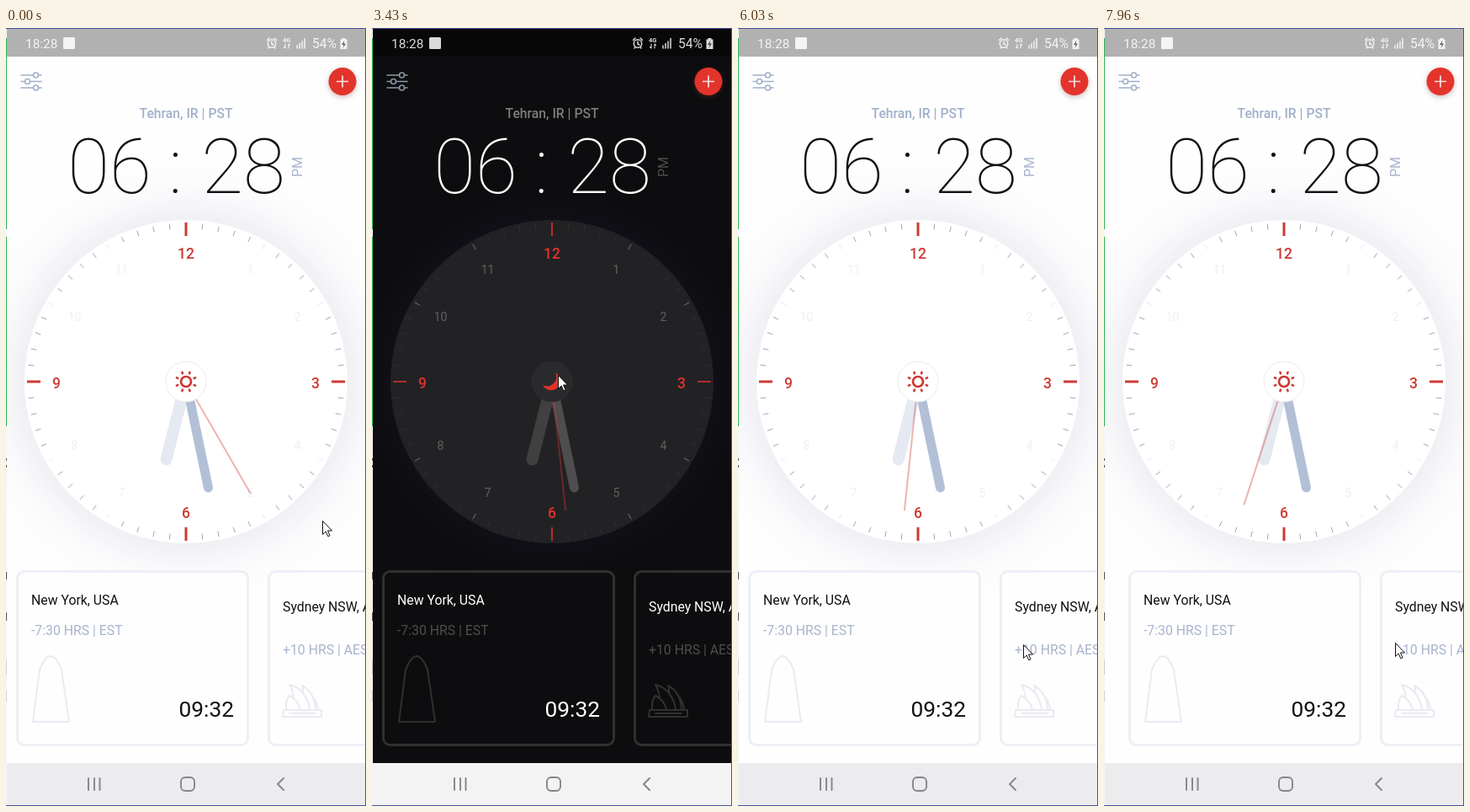
An HTML page for the animation above (8 s loop, 428 px wide and 924 px high).

```html
<!DOCTYPE html>
<html lang="en">
<head>
<meta charset="utf-8">
<title>World clock</title>
<style>
  html, body { margin: 0; width: 100%; height: 100%; overflow: hidden; background: #fefefe; }
  svg { display: block; width: 428px; height: 924px; font-family: Roboto, sans-serif; }
  .line { fill: none; stroke-linecap: round; stroke-linejoin: round; }
  .mid { text-anchor: middle; }
  .end { text-anchor: end; }
  .medium { font-weight: 500; }
  .thin { font-weight: 100; }
  #seconds { transform-origin: 214px 420px; }
  #halo { filter: blur(34px); }
  #add { filter: drop-shadow(0 2px 3px rgba(120, 60, 60, .35)); }
</style>
</head>
<body>
<svg id="stage" viewBox="0 0 428 924"></svg>
<script>
const LOOP = 8000;
const CX = 214, CY = 420;

// Each colour: light, on the way to dark, dark, on the way to light
const theme = {
  bg:     ['#fefefe', '#979797', '#0d0c0e', '#5a5a5a'],
  face:   ['#ffffff', '#a0a0a3', '#222225', '#6a6a6c'],
  title:  ['#101112', '#6a6a6a', '#ffffff', '#b4b4b4'],
  body:   ['#a1b0ca', '#929bad', '#7e7e7e', '#8a8f9a'],
  sub:    ['#a8b4ce', '#94a3c8', '#4e4e4e', '#747679'],
  menu:   ['#a1b0ca', '#8f9fc4', '#8c96a8', '#9aa8c2'],
  num:    ['#eceff5', '#b1b3b9', '#616161', '#8e9093'],
  minute: ['#b3bfd7', '#888f9e', '#4e4e4e', '#6e727a'],
  hour:   ['#e4e9f2', '#9da0a5', '#404040', '#747678'],
  tick:   ['#a9a5a5', '#85706f', '#3a2c2d', '#705f60'],
  edge:   ['#eeeff6', '#999a9b', '#303030', '#656565'],
  icon:   ['#e9ebf3', '#f2f2f2', '#303030', '#262626'],
  knob:   ['#ffffff', '#ababa8', '#2a2a2c', '#7b7b79'],
  rim:    ['#ececf0', '#a3a3a2', '#2e2e30', '#6f6f6f'],
  red:    ['#cd3a33', '#e6302a', '#e0322b', '#d8352d'],
  nav:    ['#ececef', '#f3f3f3', '#f3f3f3', '#f2f2f2'],
};

const fill = c => `style="fill:var(--${c})"`;
const stroke = (c, w) => `class="line" style="stroke:var(--${c});stroke-width:${w}"`;
const text = (x, y, size, colour, str, cls = '') =>
  `<text x="${x}" y="${y}" font-size="${size}" class="${cls}" ${fill(colour)}>${str}</text>`;
const range = (n, f) => Array.from({ length: n }, (_, i) => f(i)).join('');
const polar = (deg, r, cy = CY) => {
  const a = deg * Math.PI / 180;
  return [CX + r * Math.sin(a), cy - r * Math.cos(a)].map(v => v.toFixed(2));
};
const spoke = (deg, r1, r2) => `M${polar(deg, r1)}L${polar(deg, r2)}`;

function dial() {
  const ticks = range(60, i => i % 5 ? spoke(i * 6, 182, 188) : '');
  const hours = range(12, i => i % 3 ? spoke(i * 30, 182, 188) : '');
  const quarters = range(4, i => spoke(i * 90, 173, 189));
  const numbers = range(12, i => {
    const n = i || 12, main = i % 3 === 0;
    const [x, y] = polar(i * 30, main ? 154 : 153, main ? 422 : 419);
    return main ? text(x, +y + 6, 17.5, 'red', n, 'mid medium')
                : text(x, +y + 5, 14, 'num', n, 'mid');
  });
  return `
    <circle id="halo" cx="${CX}" cy="${CY}" r="194" fill="rgba(54,60,125,.15)"/>
    <rect id="press" y="408" width="428" height="25" fill="#c8c8c8" opacity="0"/>
    <circle cx="${CX}" cy="${CY}" r="192" ${fill('face')}/>
    <path d="${ticks}" ${stroke('tick', 1)} stroke-linecap="butt"/>
    <path d="${hours}" ${stroke('num', 1.2)}/>
    <path d="${quarters}" id="quarters" fill="none" style="stroke:var(--red)" stroke-width="3"/>
    ${numbers}
    <path d="M214 420L190.5 512.5" ${stroke('hour', 14)}/>
    <path d="M214 420L240.5 546" ${stroke('minute', 11)}/>
    <path id="seconds" d="M214 420V266" style="stroke:var(--red)" stroke-width=".9" opacity=".85"/>
    <circle cx="${CX}" cy="${CY}" r="24" style="fill:var(--knob);stroke:var(--rim)"/>
    <g id="sun">
      <circle cx="${CX}" cy="${CY}" r="6" ${stroke('red', 2.7)}/>
      <path d="${range(8, i => spoke(i * 45 + 22.5, 10.5, 12))}" ${stroke('red', 2.6)}/>
    </g>
    <path id="moon" opacity="0" ${fill('red')} d="M203 424A11 11 0 1 0 218 409.5A11 11 0 0 1 203 424Z"/>`;
}

function card(x, dy, place, zone, time, art) {
  return `<g transform="translate(${x})">
    <rect x="13.5" y="645.5" width="274" height="206" rx="8" style="fill:var(--bg);stroke:var(--edge);stroke-width:3"/>
    ${text(30, 685 + dy[0], 15.8, 'title', place)}
    ${text(30, 721 + dy[1], 15.8, 'sub', zone)}
    ${text(271, 818 + dy[2], 26.3, 'title', time, 'end')}
    <path d="${art}" ${stroke('icon', 2)}/>
  </g>`;
}

const pillar = 'M32 824L40 762Q53 730 66 762L75 824Z';
const sails = 'M31 810H76V818H30ZM34 809Q33 799 38 793Q48 798 51 809M43 796Q42 787 38 780Q58 785 62 809' +
  'M54 788Q55 784 53 781Q68 789 69 809M64 792Q71 799 72 809M38 814H69';

const statusBar = `
  <rect width="428" height="34" fill="#000" opacity=".3"/>
  <g fill="#fff" opacity=".85">
    <text x="23" y="24" font-size="15.4">18:28</text>
    <rect x="68" y="11" width="14" height="14" rx="1.5"/>
    <g class="line" stroke="#fff" stroke-width="1.5">
      <circle cx="316" cy="18.5" r="4.7"/>
      <path d="M316 16V19L318 20M310.5 14.5L313 12M321.5 14.5L319 12M312 24L313 22.5M320 24L319 22.5"/>
      <path d="M332 19V24L330.5 22.5M336 24V19L337.5 20.5" stroke-width="1.1"/>
      <path d="M346 24V21M349 24V18.5M352 24V16M355 24V12.5"/>
    </g>
    <text x="329" y="17" font-size="7.5" font-weight="700">4G</text>
    <text x="364" y="24" font-size="15.6">54%</text>
    <path d="M397.5 13.5H399.5V12H403.5V13.5H405.5V25H397.5Z"/>
    <path d="M402.5 14.5L399 20H401.5L400.5 24L404 18.5H401.5Z" fill="#555"/>
  </g>`;

const header = `
  <path d="M18 56H32M39 56H42M18 63.5H22M29 63.5H42M18 71H32M39 71H42" ${stroke('menu', 1.6)}/>
  ${[[35.5, 56], [25.5, 63.5], [35.5, 71]].map(([x, y]) =>
    `<circle cx="${x}" cy="${y}" r="3" ${stroke('menu', 1.6)}/>`).join('')}
  <circle id="add" cx="400" cy="63.5" r="16.5" fill="#e2342c"/>
  <path d="M393 63.5H407M400 56.5V70.5" stroke="#fbe4e2" stroke-width="1.7"/>
  ${text(214, 107, 15.7, 'body', 'Tehran, IR | PST', 'mid medium')}
  ${text(123, 196, 91, 'title', '06', 'mid thin')}
  ${text(201.5, 196, 91, 'title', ':', 'mid thin')}
  ${text(282, 196, 91, 'title', '28', 'mid thin')}
  <g transform="translate(352 177) rotate(-90)">${text(0, 0, 16, 'sub', 'PM')}</g>`;

const navBar = `
  <rect y="873" width="428" height="51" ${fill('nav')}/>
  <g class="line" stroke="#85858b" stroke-width="1.9">
    <path d="M98 891V905M105 891V905M111.500 891V905M330 891L323 898L330 905"/>
    <rect x="208" y="890" width="16" height="16" rx="5"/>
  </g>`;

const surround = `
  <rect width="1" height="924" fill="#f4f4f4"/>
  <path d="M.5 12V239M.5 248V473" stroke="#2fb457"/>
  <path d="M.5 511V514M.5 519V522M.5 646V655M.5 694V704" stroke="#555"/>
  <path d="M.5 750V768M.5 787V800" stroke="#d0d0d4"/>
  <path d="M0 .5H428M427.500 0V924M0 923.500H428" stroke="#46509a" fill="none"/>`;

const $ = id => document.getElementById(id);
$('stage').innerHTML = `
  <rect width="428" height="924" ${fill('bg')}/>
  ${header}
  ${dial()}
  <g id="cards">
    ${card(0, [0, 0, 0], 'New York, USA', '-7:30 HRS | EST', '09:32', pillar)}
    ${card(299, [8, 23, -7], 'Sydney NSW, Australia', '+10 HRS | AEST', '23:50', sails)}
  </g>
  ${statusBar}${navBar}${surround}
  <path id="cursor" d="M.5 .5V16.5L4.200 13L6.800 18.800L9 17.800L6.500 12H11.500Z" fill="#fff" stroke="#111"/>`;

// steps: [ms, properties, easing to the next step]
function play(el, steps) {
  el.animate(steps.map(([t, props, easing = 'linear']) => ({ offset: t / LOOP, easing, ...props })),
    { duration: LOOP, iterations: Infinity });
}
const hold = (prop, list) => list.map(([t, v]) => [t, { [prop]: v }, 'step-end']);
const move = list => list.map(([t, x, y, e]) => [t, { transform: `translate(${x}px,${y}px)` }, e]);

const colours = [{}, {}, {}, {}];
for (const [name, values] of Object.entries(theme)) {
  CSS.registerProperty({ name: `--${name}`, syntax: '<color>', inherits: true, initialValue: values[0] });
  values.forEach((v, i) => colours[i][`--${name}`] = v);
}
const [light, dimming, dark, rising] = colours;
play($('stage'), [
  [0, light], [2630, light], [2630, dimming], [3160, dark],
  [4800, dark], [5060, rising], [5600, light], [8000, light],
]);

play($('seconds'), hold('transform',
  [0, 400, 1400, 2430, 3430, 4400, 5400, 6400, 7400, 8000]
    .map((t, i) => [t, `rotate(${(25 + Math.min(i, 8)) * 6}deg)`])));
play($('sun'), hold('opacity', [[0, 1], [2630, 0], [4800, 1], [8000, 1]]));
play($('moon'), hold('opacity', [[0, 0], [2630, 1], [4800, 0], [8000, 0]]));
play($('quarters'), [
  [0, 3], [2630, 3], [3160, 1.6], [4800, 1.6], [5060, 2], [5600, 3], [8000, 3],
].map(([t, w]) => [t, { strokeWidth: `${w}px` }]));
play($('press'), [
  [0, 0], [2360, 0], [2360, .3], [2630, .15], [2900, 0],
  [4800, 0], [4800, .3], [5060, .3], [5500, 0], [8000, 0],
].map(([t, opacity]) => [t, { opacity }]));

play($('cards'), move([
  [0, 0, 0], [6330, 0, 0, 'ease-in-out'], [6660, -206, 0, 'ease-in-out'], [6800, -195, 0, 'ease-out'],
  [7110, -172, 0], [7180, -172, 0, 'ease-in-out'], [7820, 26, 0, 'ease-in-out'], [7960, 17, 0], [8000, 17, 0],
]));
play($('cursor'), move([
  [0, 376, 585], [960, 376, 585], [960, 363, 571], [1240, 288, 452], [1430, 230, 381, 'ease-out'],
  [1560, 221, 412], [5630, 221, 412, 'ease-in-out'], [6030, 339, 732], [6330, 339, 732, 'ease-in-out'],
  [6680, 14, 769], [7160, 14, 769, 'ease-in-out'], [7840, 346, 730], [8000, 346, 730],
]));
</script>
</body>
</html>
```
